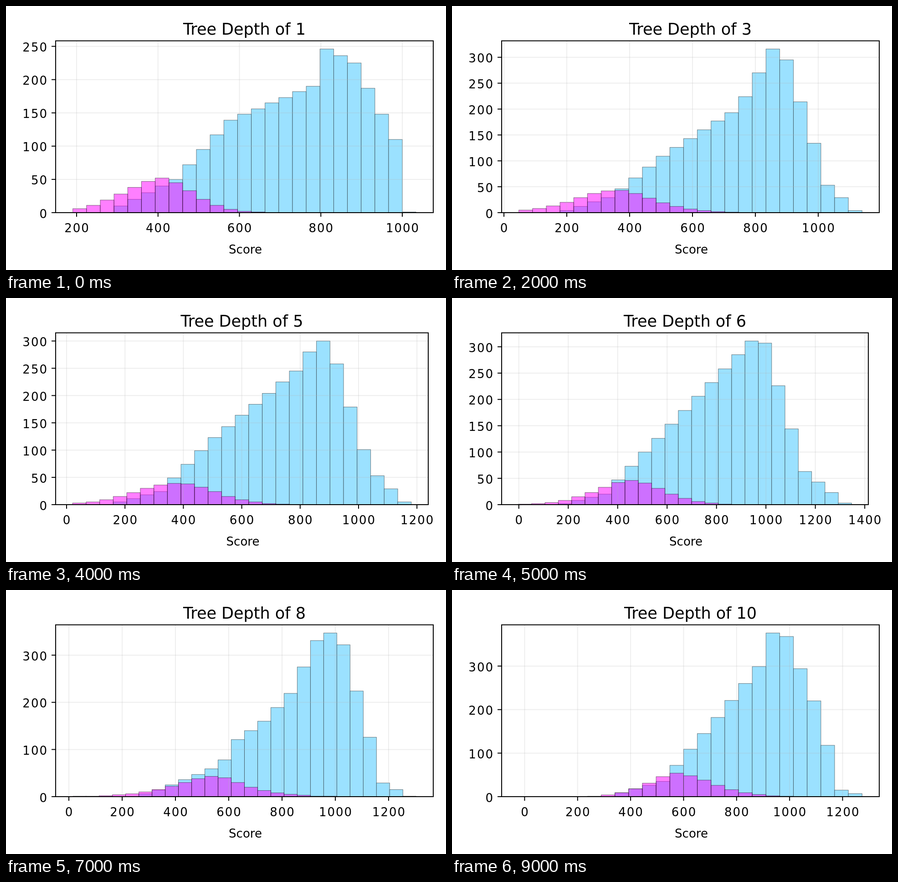
Recreate the animation shown at these times as an HTML page. Size 966x580 px, loop 10000 ms.

```html
<!DOCTYPE html>
<html lang="en">
<head>
<meta charset="utf-8">
<title>Score by tree depth</title>
<style>
  html, body { margin: 0; width: 100%; height: 100%; overflow: hidden; background: #fff; }
  svg { display: block; width: 966px; height: 580px; }
  text { font: 26px "DejaVu Sans", sans-serif; text-anchor: middle; }
  .title { font-size: 35px; }
  .score, .count { letter-spacing: 2px; }
  .count { text-anchor: end; }
  .blue { fill: #9be1ff; }
  .pink { fill: rgba(255, 0, 255, .5); }
  .bar { stroke: rgba(0, 0, 0, .5); stroke-width: 1; }
  .grid { stroke: rgba(176, 176, 176, .22); stroke-width: 2; }
  .axis { stroke: #000; stroke-width: 2; fill: none; }
</style>
</head>
<body>
<svg id="stage" viewBox="0 0 966 580"></svg>
<script>
const LEFT = 109, RIGHT = 938, TOP = 76.5, BOTTOM = 454;
const HOLD = 1000;

// Straight segments through key points { bin: count }, zero outside them
function slopes(points) {
  const bins = Object.keys(points).map(Number);
  return bin => {
    const next = bins.findIndex(b => b >= bin);
    if (next < 0 || (next === 0 && bins[0] > bin)) return 0;
    const b = bins[next], a = bins[Math.max(next - 1, 0)];
    const part = b === a ? 1 : (bin - a) / (b - a);
    return points[a] + (points[b] - points[a]) * part;
  };
}

// Lopsided bell, with the distance to half height given for each side
const bell = (peak, mode, leftHalf, rightHalf) => bin => {
  const distance = Math.abs(bin - mode) / (bin < mode ? leftHalf : rightHalf);
  return peak * 0.5 ** (distance ** 1.75);
};

const mean = (f, g) => bin => (f(bin) + g(bin)) / 2;

// zero: x of score 0; step: pixels per 200 points
const depth1 = {
  zero: -23.75, step: 178.75, bins: 25,
  blue: slopes({ 2: 0, 7: 50, 11: 139, 17: 190, 18: 246, 20: 225, 23: 110, 24: 1 }),
  pink: bell(52, 6, 3.2, 2.5)
};
const depth2 = {
  zero: 111.3, step: 139.6, bins: 26,
  blue: slopes({ 3: 0, 7: 40, 15: 196, 18: 338, 19: 300, 22: 43, 24: 2 }),
  pink: bell(48, 7, 3.4, 2.8)
};
const depth4 = {
  zero: 117.5, step: 130.75, bins: 25, right: 933,
  blue: slopes({ 2: 0, 6: 28, 10: 120, 16: 205, 18: 293, 19: 290, 22: 63, 24: 6 }),
  pink: bell(40, 6, 3.2, 3.5)
};
const depth6 = {
  zero: 146.7, step: 108.5, bins: 25, right: 914,
  blue: slopes({ 3: 2, 6: 20, 9: 100, 17: 311, 18: 307, 21: 63, 24: 3 }),
  pink: bell(46, 8, 3, 2.7)
};
const depth7 = {
  zero: 133.6, step: 117.9, bins: 26,
  blue: slopes({ 4: 0, 11: 88, 12: 147, 16: 195, 18: 323, 20: 290, 23: 32, 25: 1 }),
  pink: bell(42, 10, 4, 2)
};
const depth9 = {
  zero: 153.5, step: 115, bins: 26,
  blue: slopes({ 6: 2, 10: 42, 14: 148, 19: 387, 20: 354, 23: 25, 25: 0 }),
  pink: bell(46, 10.5, 2.8, 3.4)
};
const depth10 = {
  zero: 159.4, step: 116.35, bins: 25,
  blue: slopes({ 6: 0, 10: 35, 14: 182, 17: 299, 18: 376, 19: 368, 21: 220, 23: 15, 24: 7 }),
  pink: bell(54, 11, 2.3, 2.9)
};

const between = (a, b, view) =>
  ({ ...view, blue: mean(a.blue, b.blue), pink: mean(a.pink, b.pink) });

const charts = [
  depth1, depth2,
  between(depth2, depth4, { zero: 114, step: 138, bins: 25 }),
  depth4,
  between(depth4, depth6, { zero: 133, step: 128.2, bins: 25, right: 927 }),
  depth6, depth7,
  between(depth7, depth9, { zero: 138, step: 117, bins: 26 }),
  depth9, depth10
];

const line = (kind, x1, y1, x2, y2) =>
  `<line class="${kind}" x1="${x1}" y1="${y1}" x2="${x2}" y2="${y2}"/>`;
const label = (kind, x, y, content) =>
  `<text class="${kind}" x="${x}" y="${y}">${content}</text>`;

function drawChart({ zero, step, bins, blue, pink, right = RIGHT }, depth) {
  const width = right - LEFT;
  const center = LEFT + width / 2;
  const firstBar = LEFT + width / 22;
  const barWidth = width / 1.1 / bins;
  const sample = curve => Array.from({ length: bins }, (_, bin) => Math.round(curve(bin)));
  const blueCounts = sample(blue);
  const limit = Math.max(...blueCounts) * 1.05;
  const unit = (BOTTOM - TOP) / limit;

  const bars = (kind, counts) => counts.map((count, i) => count
    ? `<rect class="bar ${kind}" x="${firstBar + i * barWidth}" y="${BOTTOM - count * unit}"
        width="${barWidth}" height="${count * unit}"/>`
    : "").join("");

  let grid = "", axes = "";
  for (let score = 0, x = zero; x <= right; score += 200, x += step) {
    if (x < LEFT) continue;
    grid += line("grid", x, TOP, x, BOTTOM);
    axes += line("axis", x, BOTTOM, x, BOTTOM + 9) + label("score", x + 1, 497, score);
  }
  const countStep = limit > 350 ? 100 : 50;
  for (let count = 0; count <= limit; count += countStep) {
    const y = BOTTOM - count * unit;
    grid += line("grid", LEFT, y, right, y);
    axes += line("axis", LEFT - 9, y, LEFT, y) + label("count", 92, y + 11.5, count);
  }
  axes += `<rect class="axis" x="${LEFT}" y="${TOP}" width="${width}" height="${BOTTOM - TOP}"/>`;

  return bars("blue", blueCounts) + bars("pink", sample(pink)) + grid + axes
    + label("title", center, 63, `Tree Depth of ${depth}`)
    + label("name", center + 2, 544, "Score");
}

const stage = document.getElementById("stage");
const start = performance.now();
let shown = -1;

function render() {
  const index = Math.floor((performance.now() - start) / HOLD) % charts.length;
  if (index !== shown) {
    stage.innerHTML = drawChart(charts[index], index + 1);
    shown = index;
  }
  requestAnimationFrame(render);
}
render();
</script>
</body>
</html>
```
